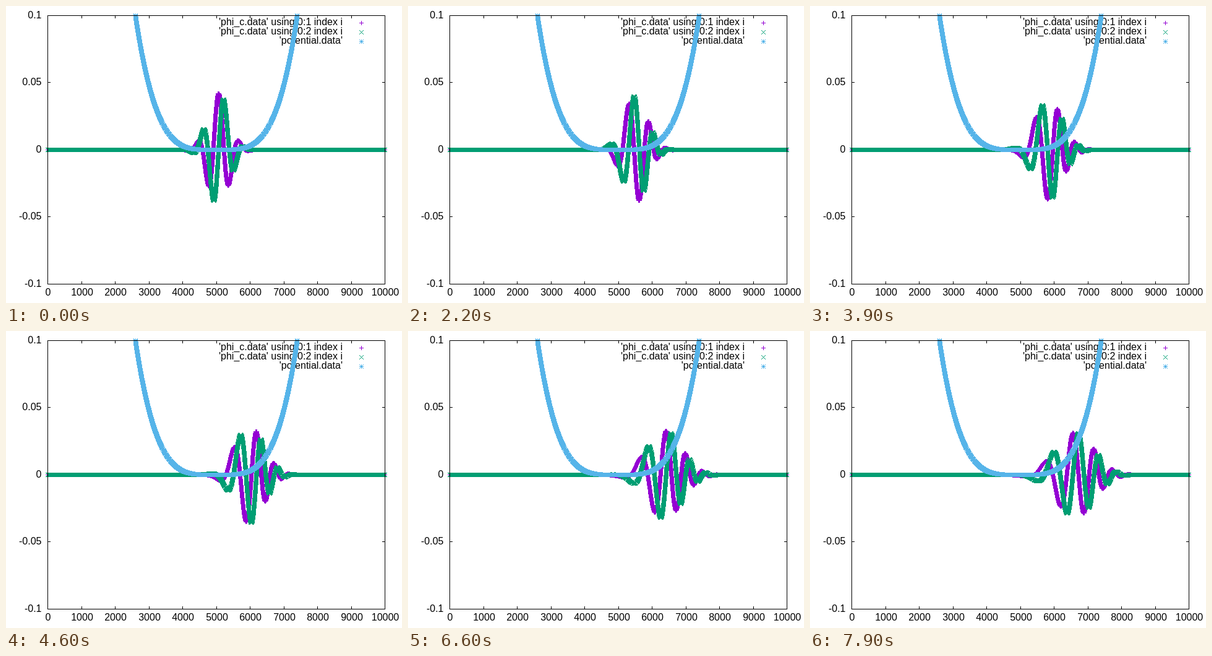
Write an HTML page with a canvas that moves like this. It is 640 by 480 pixels and loops after 8 s.

```html
<!DOCTYPE html>
<html lang="en">
<head>
<meta charset="utf-8">
<title>Wave packet in a quartic well</title>
<style>
  html, body { margin: 0; width: 640px; height: 480px; overflow: hidden; background: #fff; }
  svg, canvas { position: absolute; left: 0; top: 0; }
  text { font: 16px "Liberation Sans", Arial, sans-serif; fill: #000; white-space: pre; }
</style>
</head>
<body>
<svg id="axes" width="640" height="480" viewBox="0 0 640 480"></svg>
<canvas id="plot" width="640" height="480"></canvas>
<script>
const LEFT = 67, RIGHT = 612, TOP = 15, BOTTOM = 449, ZERO = 232;
const WIDTH = RIGHT - LEFT, MID = LEFT + WIDTH / 2;
const POINTS = 10000;
const PURPLE = '#9400d3', GREEN = '#009e73', BLUE = '#56b4e9';
const FRAME_MS = 100, FRAMES = 80;

// ---- axes and key ----
const svg = document.getElementById('axes');

function add(tag, attrs, text) {
  const el = document.createElementNS('http://www.w3.org/2000/svg', tag);
  for (const key in attrs) el.setAttribute(key, attrs[key]);
  if (text) el.textContent = text;
  svg.appendChild(el);
}
const label = (text, x, y, anchor) => add('text', { x, y, 'text-anchor': anchor }, text);
const tic = (x, y, width, height) =>
  add('rect', { x, y, width, height, 'shape-rendering': 'crispEdges' });

for (let i = 0; i <= 10; i++) {
  const x = Math.round(LEFT + WIDTH * i / 10);
  tic(x, TOP, 1, 5);
  tic(x, BOTTOM - 4, 1, 5);
  label(String(i * 1000), x + 1, 468, 'middle');
}
['0.1', '0.05', '0', '-0.05', '-0.1'].forEach((text, i) => {
  const y = Math.floor(TOP + (BOTTOM - TOP) * i / 4);
  tic(LEFT, y, 5, 1);
  tic(RIGHT - 4, y, 5, 1);
  label(text, 57.5, y + 5, 'end');
});
label("'phi_c.data' using 0:1 index i", 544, 31, 'end');
label("'phi_c.data' using 0:2 index i", 544, 46, 'end');
label("'potential.data'", 544, 61, 'end');

// ---- Schrödinger equation, Crank–Nicolson, in pixels and seconds ----
const DX = 0.5, DT = 0.025, STEPS = 4, WARMUP = 8;
const N = WIDTH / DX + 1;
const H = 60;           // hbar / m
const WELL = 1.25e-7;   // quartic strength / m
const start = { x: 340.8, k: 0.182, s2: 300, phase: -0.22, amp: 91.5 };

function simulate() {
  const array = () => new Float64Array(N);
  const re = array(), im = array(), mr = array(), mi = array(), pr = array(), pi = array();
  const q = DT * H / (4 * DX * DX);

  for (let j = 0, cr = 0, ci = 0; j < N; j++) {
    const x = LEFT + j * DX, d = x - start.x;
    const env = start.amp * Math.exp(-d * d / (2 * start.s2));
    re[j] = env * Math.cos(start.k * d + start.phase);
    im[j] = env * Math.sin(start.k * d + start.phase);
    const a = 1 - q * ci;
    const b = 2 * q + DT / 2 * WELL / H * (x - MID) ** 4 + q * cr;
    const n = a * a + b * b;
    mr[j] = a / n;
    mi[j] = -b / n;
    cr = q * mi[j];
    ci = -q * mr[j];
  }

  function step() {
    for (let j = 0, ur = 0, ui = 0; j < N; j++) {
      const a = re[j] - q * ui, b = im[j] + q * ur;
      ur = pr[j] = a * mr[j] - b * mi[j];
      ui = pi[j] = a * mi[j] + b * mr[j];
    }
    for (let j = N - 1, ur = 0, ui = 0; j >= 0; j--) {
      const cr = q * mi[j], ci = -q * mr[j];
      const a = pr[j] - (cr * ur - ci * ui);
      const b = pi[j] - (cr * ui + ci * ur);
      ur = a;
      ui = b;
      re[j] = 2 * ur - re[j];
      im[j] = 2 * ui - im[j];
    }
  }

  for (let i = 0; i < WARMUP; i++) step();
  const frames = [];
  for (let f = 0; f < FRAMES; f++) {
    frames.push({ re: re.slice(), im: im.slice() });
    for (let i = 0; i < STEPS; i++) step();
  }
  return frames;
}

// ---- drawing ----
const ctx = document.getElementById('plot').getContext('2d');

function plus(x, y) {
  ctx.fillRect(x - 3, y, 7, 1);
  ctx.fillRect(x, y - 3, 1, 7);
}
function cross(x, y) {
  for (let i = -3; i <= 3; i++) {
    ctx.fillRect(x + i, y + i, 1, 1);
    ctx.fillRect(x + i, y - i, 1, 1);
  }
}
function star(x, y) {
  plus(x, y);
  cross(x, y);
}

// Stamps one marker per data point, skipping repeats on the same pixel.
function scatter(color, mark, height) {
  ctx.fillStyle = color;
  let lastX, lastY;
  for (let i = 0; i <= POINTS; i++) {
    const h = height(i);
    if (h > ZERO - TOP + 0.01) continue;
    const x = Math.round(LEFT + WIDTH * i / POINTS), y = Math.round(ZERO - h);
    if (x === lastX && y === lastY) continue;
    mark(x, y);
    lastX = x;
    lastY = y;
  }
}

const sample = values => i => {
  const p = i / POINTS * (N - 1), j = Math.min(N - 2, Math.floor(p));
  return values[j] + (values[j + 1] - values[j]) * (p - j);
};
const potential = i => (ZERO - TOP) * ((i - 5000) / 2400) ** 4;

function draw({ re, im }) {
  ctx.clearRect(0, 0, 640, 480);
  ctx.fillStyle = PURPLE;
  plus(574, 27);
  scatter(PURPLE, plus, sample(re));
  ctx.fillStyle = GREEN;
  cross(574, 42);
  scatter(GREEN, cross, sample(im));
  ctx.fillStyle = BLUE;
  star(574, 57);
  scatter(BLUE, star, potential);
  ctx.strokeStyle = '#000';
  ctx.strokeRect(LEFT + 0.5, TOP + 0.5, WIDTH, BOTTOM - TOP);
}

const frames = simulate();
let shown = -1, begin;

function tick(now) {
  if (begin === undefined) begin = now;
  const f = Math.floor((now - begin) / FRAME_MS) % FRAMES;
  if (f !== shown) draw(frames[shown = f]);
  requestAnimationFrame(tick);
}
draw(frames[0]);
requestAnimationFrame(tick);
</script>
</body>
</html>
```
